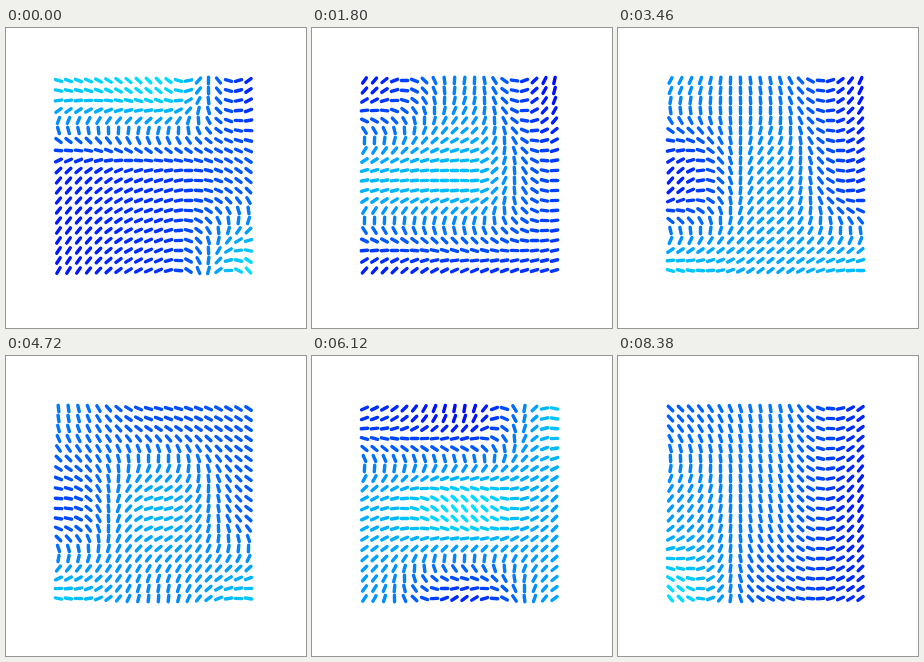
An HTML page with a canvas for the animation above (8.4 s loop, 300 by 300 pixels).

```html
<!DOCTYPE html>
<html lang="en">
<head>
<meta charset="utf-8">
<title>Noise field</title>
<style>
  html, body { margin: 0; width: 100%; height: 100%; overflow: hidden; background: #fff; }
  canvas { display: block; width: 300px; height: 300px; }
</style>
</head>
<body>
<canvas id="stage" width="300" height="300"></canvas>
<script>
const ctx = document.getElementById('stage').getContext('2d');
const LOOP = 8400, STEP = 20;
const COUNT = 20, GAP = 10, ORIGIN = 52.5;
const HALF = 3.2, WEIGHT = 3.4;
const CELL = 10;         // dashes between two key points
const KEY_TIME = 1960;   // ms between two keys

// Key points of the field: each eases through its own keys, -1 to 1.
const field = [
  [ // top
    [.60, -.83, .31, -.64, -.45, .62],
    [.75, .03, -.08, -.99, .04, -.45],
    [-.74, -.96, -.87, .65, -.58, -1.3]
  ],
  [ // middle
    [-.78, .47, -.97, .37, .34, -.30],
    [-.60, .53, .20, .82, .06, -.70],
    [-.27, -.54, -.66, .28, -.86, -.80]
  ],
  [ // bottom
    [-.83, -.80, .85, .15, .89, .40],
    [-.63, -.66, .45, -.76, -.42, -.10],
    [.83, -.61, .72, .37, -.66, -.88]
  ]
];

// Smooth interpolation along a list at a fractional position.
function ease(list, at) {
  const i = Math.floor(at), u = at - i;
  return list[i] + (list[i + 1] - list[i]) * u * u * (3 - 2 * u);
}

function drawDash(x, y, n) {
  const angle = Math.PI * (n + 0.5);
  const dx = HALF * Math.cos(angle), dy = HALF * Math.sin(angle);
  const green = Math.max(0, Math.min(255, Math.round(127.5 * (1 + n))));
  ctx.strokeStyle = `rgb(0, ${green}, 255)`;
  ctx.beginPath();
  ctx.moveTo(x - dx, y - dy);
  ctx.lineTo(x + dx, y + dy);
  ctx.stroke();
}

function draw(time) {
  const now = field.map(row => row.map(keys => ease(keys, time / KEY_TIME)));
  ctx.clearRect(0, 0, 300, 300);
  ctx.lineWidth = WEIGHT;
  ctx.lineCap = 'round';
  for (let j = 0; j < COUNT; j++) {
    for (let i = 0; i < COUNT; i++) {
      const n = ease(now.map(row => ease(row, i / CELL)), j / CELL);
      drawDash(ORIGIN + i * GAP, ORIGIN + j * GAP, n);
    }
  }
}

function tick() {
  const time = performance.now() % LOOP;
  draw(Math.floor(time / STEP) * STEP);
  requestAnimationFrame(tick);
}
tick();
</script>
</body>
</html>
```
